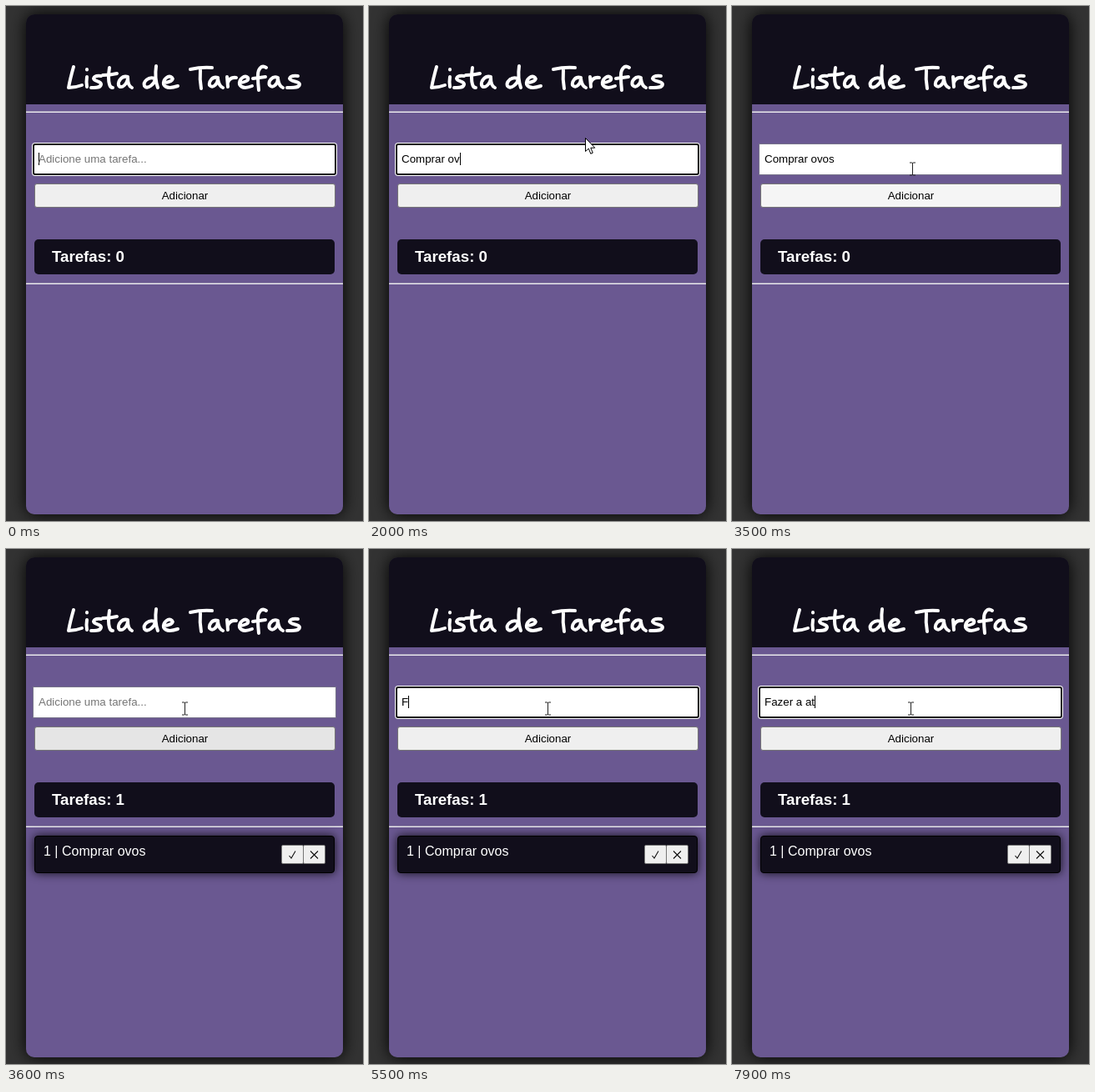
Write an HTML page that moves like this. It is 428 by 618 pixels and loops after 8 s.

```html
<!DOCTYPE html>
<html lang="pt-BR">
<head>
<meta charset="utf-8">
<title>Lista de Tarefas</title>
<style>
  html, body { margin: 0; width: 100%; height: 100%; overflow: hidden; background: #333; }
  #stage {
    position: relative; width: 428px; height: 618px; overflow: hidden;
    background: #333; color: #fff;
    font: 13.333px/15px "Liberation Sans", Arial, sans-serif; white-space: pre;
  }
  #stage * { box-sizing: border-box; }
  #stage > *, #item > * { position: absolute; }
  #card {
    left: 24px; top: 10px; width: 380px; height: 600px; border-radius: 10px;
    background: linear-gradient(#110e1b 108px, #6a5891 108px);
    box-shadow: 0 0 20px #000;
  }
  .rule { left: 24px; width: 380px; height: 2px; background: #eceaf0; border-top: 1px solid #a69fb8; }
  #field {
    left: 32px; top: 165px; width: 364px; height: 38px;
    padding: 10px 6px; background: #fff; border: 1px solid #77738a; color: #000;
  }
  #field.focus {
    padding: 9px 5px; border: 2px solid #101010; border-radius: 3px; box-shadow: 0 0 0 1px #fff;
  }
  #hint { position: absolute; color: #757575; }
  #caret { display: inline-block; width: 1px; height: 15px; margin-right: -1px; background: #000; vertical-align: top; }
  #add {
    left: 34px; top: 213px; width: 361px; height: 29px; padding-top: 6px;
    border: 1px solid #767676; border-radius: 3px; color: #000; text-align: center;
  }
  #count {
    left: 34px; top: 280px; width: 360px; height: 42px; padding: 10px 21px;
    border-radius: 5px; background: #110e1b; font-weight: bold; font-size: 18.72px; line-height: 21px;
  }
  #item {
    left: 34px; top: 344px; width: 360px; height: 45px; padding: 9px 10px;
    border: 1px solid #000; border-radius: 4px; background: #110e1b;
    box-shadow: 0 0 12px rgba(0, 0, 0, .85); font-size: 16px; line-height: 18px;
  }
  #item svg {
    top: 10px; width: 27px; height: 23px; background: #efefef;
    border: 1px solid #767676; border-radius: 2px; fill: none; stroke: #111; stroke-width: 1.1;
  }
  #title, #mouse { left: 0; top: 0; }
  #title { fill: none; stroke: #fff; stroke-width: 4; stroke-linecap: round; stroke-linejoin: round; }
  #mouse { stroke-linejoin: round; }
</style>
</head>
<body>
<div id="stage">
  <div id="card"></div>
  <svg id="title" width="428" height="130" role="img" aria-label="Lista de Tarefas">
    <path d="M81 73Q77 87 75 98Q83 98 91 95"/>
    <path d="M97 85Q96 91 97 97M97 76V76.5"/>
    <path d="M114 84Q106 83 105 87C106 91 114 90 114 94C113 99 107 98 102 98"/>
    <path d="M124 74Q122 87 124 94Q125 98 128 98M116 83Q125 83 133 81"/>
    <path d="M146 85C139 83 134 90 135 95C138 101 146 93 146 86Q146 96 151 98"/>
    <path d="M178 87C171 84 164 91 166 96C170 101 178 93 179 88M180 72Q178 87 182 98"/>
    <path d="M189 92C195 92 202 89 199 86C195 82 188 88 189 94C192 100 200 98 206 96"/>
    <path d="M221 76Q234 73 247 74M233 76Q232 88 234 99"/>
    <path d="M254 86C247 84 243 91 244 95C248 100 254 93 254 87Q255 96 260 98"/>
    <path d="M265 85L266 97M266 92Q268 85 276 86"/>
    <path d="M280 92C286 92 292 89 290 86C286 82 279 88 280 94C283 100 290 98 295 96"/>
    <path d="M312 74C306 70 302 76 302 83Q302 93 303 101M296 87Q304 86 311 85"/>
    <path d="M326 86C319 83 314 91 316 95C320 100 326 93 326 87Q327 96 332 98"/>
    <path d="M350 84Q341 83 340 87C341 91 352 90 352 94C351 99 344 98 337 98"/>
  </svg>
  <div class="rule" style="top:126px"></div>
  <div id="field"><span id="hint">Adicione uma tarefa...</span><span id="text"></span><span id="caret"></span></div>
  <div id="add">Adicionar</div>
  <div id="count"></div>
  <div class="rule" style="top:332px"></div>
  <div id="item">1 | Comprar ovos<svg style="left:295px" viewBox="0 0 25 21"><path d="M8.5 12L11 15L16 6.5"/></svg><svg style="left:321px" viewBox="0 0 25 21"><path d="M8 6.5L17 15.5M17 6.5L8 15.5"/></svg></div>
  <svg id="mouse" width="30" height="30" overflow="visible">
    <path id="arrow" fill="#fff" stroke="#000" d="M0 0V16L3.8 12.6L6.3 18.8L8.8 17.7L6.3 11.7H11.3Z"/>
    <path id="hand" fill="#fff" stroke="#000" d="M-1.5 14V2Q-1.5 .5 0 .5T1.6 2V7.5Q2 6 3.5 6.3T5 8Q6 6.7 7.3 7.3T8.5 9Q10 8 11 9T11.6 11V16Q11.6 19 9.5 21V23.5H1V21.5Q-2 18.5-4.8 14Q-5.5 12-4 11.6T-1.5 14M1.6 7.5V12M5 8V12M8.5 9V12"/>
    <path id="beam" fill="none" stroke="#222" d="M-3.5-7.5H-1Q0-7.5 0-6.5Q0-7.5 1-7.5H3.5M0-6.5V6.5M-3.5 7.5H-1Q0 7.5 0 6.5Q0 7.5 1 7.5H3.5"/>
  </svg>
</div>
<script>
  const LOOP = 8000, STEP = 100;
  const SUBMIT = 3600;
  const ui = {};
  document.querySelectorAll('[id]').forEach(el => ui[el.id] = el);

  // [time, characters typed]
  const words = [
    { from: 0, text: 'Comprar ovos', keys: [[200, 1], [300, 2], [400, 3], [500, 4], [1600, 5], [1800, 9], [2000, 10], [2100, 11], [2300, 12]] },
    { from: SUBMIT, text: 'Fazer a at', keys: [[4200, 0], [5500, 1], [5800, 2], [6000, 3], [6800, 4], [7000, 5], [7100, 6], [7800, 7], [7900, 10]] }
  ];
  // [time, x, y]
  const route = [[100, 259, 158], [2200, 259, 158], [2600, 256, 227], [3300, 256, 227], [3500, 216, 195], [3600, 214, 191]];

  function pointer(t) {
    const i = route.findIndex(p => p[0] > t);
    if (i < 0) return route[route.length - 1].slice(1);
    if (i === 0) return route[0].slice(1);
    const [t0, x0, y0] = route[i - 1], [t1, x1, y1] = route[i];
    const k = (t - t0) / (t1 - t0);
    return [x0 + (x1 - x0) * k, y0 + (y1 - y0) * k].map(Math.round);
  }

  function draw(t) {
    const word = words[t < SUBMIT ? 0 : 1];
    const [since, typed] = word.keys.filter(k => k[0] <= t).pop() || [word.from, 0];
    const focus = t < 3300 || t >= 4200;
    const blinkOn = Math.floor((t - since) / 500) % 2 === 0;

    ui.text.textContent = word.text.slice(0, typed);
    ui.hint.hidden = typed > 0;
    ui.field.classList.toggle('focus', focus);
    ui.caret.style.visibility = focus && blinkOn ? 'visible' : 'hidden';

    const pressed = t >= 3300 && t < SUBMIT, released = t >= SUBMIT && t < 3800;
    ui.add.style.background = pressed ? '#f5f5f5' : released ? '#e5e5e5' : '#efefef';

    const done = t >= SUBMIT;
    ui.count.textContent = 'Tarefas: ' + (done ? 1 : 0);
    ui.item.style.visibility = done ? 'visible' : 'hidden';

    const [x, y] = pointer(t);
    const shape = y >= 165 && y < 203 ? 'beam' : y >= 213 && y < 242 ? 'hand' : 'arrow';
    for (const id of ['arrow', 'hand', 'beam']) ui[id].style.display = id === shape ? '' : 'none';
    ui.mouse.style.transform = `translate(${x + .5}px, ${y + .5}px)`;
    ui.mouse.style.visibility = t < route[0][0] ? 'hidden' : 'visible';
  }

  let start;
  function tick(now) {
    start ??= now;
    draw(Math.floor((now - start) % LOOP / STEP) * STEP);
    requestAnimationFrame(tick);
  }
  draw(0);
  requestAnimationFrame(tick);
</script>
</body>
</html>
```
